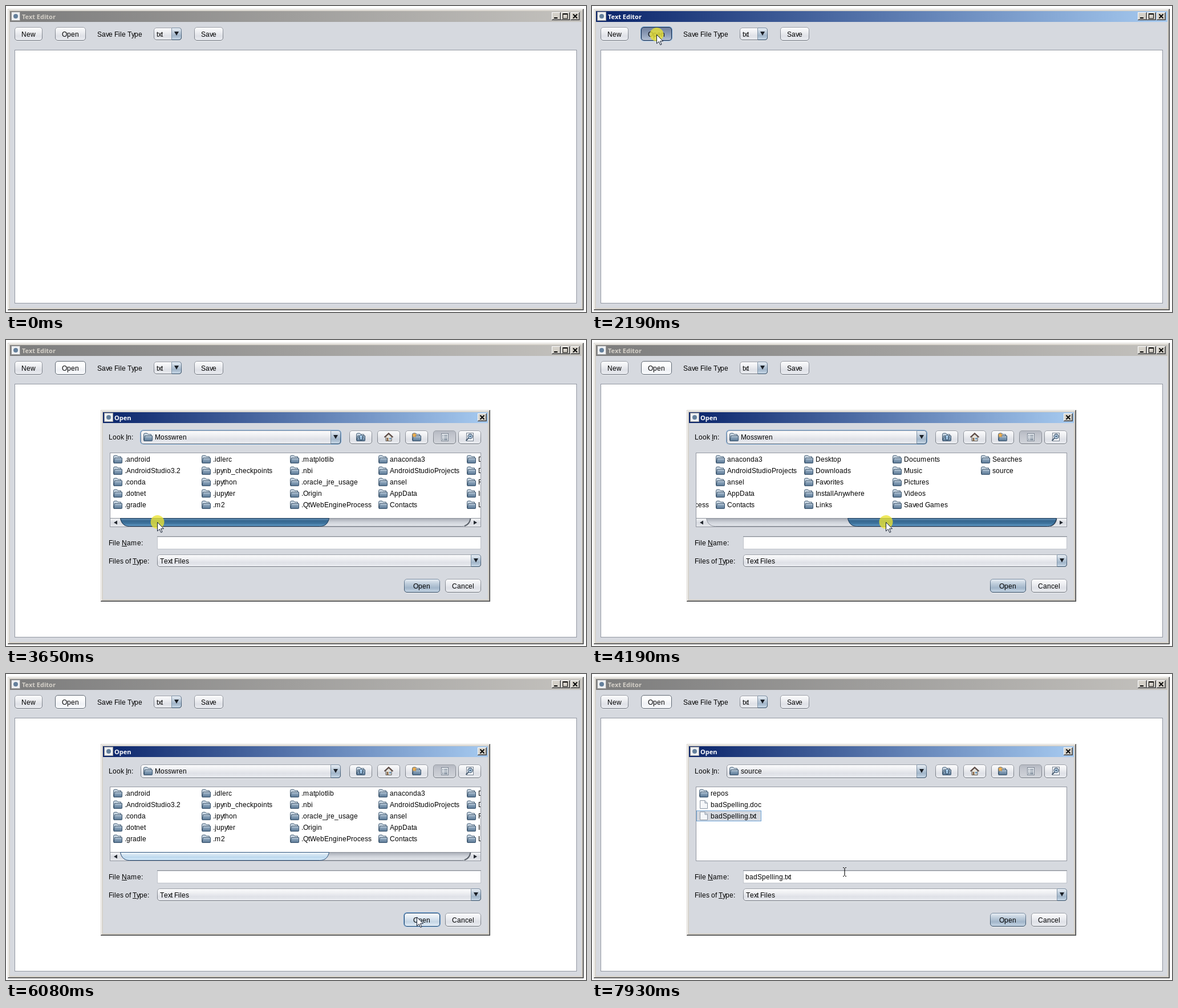
An HTML page that plays this animation: 1017 by 538 pixels, repeating every 7990 ms.

```html
<!DOCTYPE html>
<html lang="en">
<head>
<meta charset="utf-8">
<title>Text Editor</title>
<style>
html, body { margin: 0; width: 100%; height: 100%; overflow: hidden; background: #fff; }
svg { display: block; width: 1017px; height: 538px; }
text { font: 12px "Liberation Sans", Arial, sans-serif; fill: #000; white-space: pre; }
.cap { font: bold 11px "Noto Sans", "Open Sans", sans-serif; fill: #fff; }
.off { fill: #d4d0c8; }
</style>
</head>
<body>
<svg id="stage" viewBox="0 0 1017 538" xmlns="http://www.w3.org/2000/svg"></svg>
<script>
const LOOP = 7990, STEP = 60;
const pen = document.createElement('canvas').getContext('2d');
pen.font = '12px "Liberation Sans", Arial, sans-serif';

// Whole-pixel glyph advances, as in hinted screen text.
const narrow = { v: 5, x: 5, y: 5, m: 11 };
const advance = c => narrow[c] || Math.round(pen.measureText(c).width);
function text(x, y, str, mnemonic = -1) {
  const xs = [];
  let line = '';
  [...str].forEach((c, i) => {
    xs.push(x);
    if (i === mnemonic) line = rect(x, y + 1, advance(c), 1, '#000');
    x += advance(c);
  });
  return `<text x="${xs.join(' ')}" y="${y}">${str}</text>${line}`;
}
const rect = (x, y, w, h, fill, more = '') =>
  `<rect x="${x}" y="${y}" width="${w}" height="${h}" fill="${fill}" ${more}/>`;
const path = (d, fill, more = '') => `<path d="${d}" fill="${fill}" ${more}/>`;
const group = (id, body, more = '') => `<g id="${id}" ${more}>${body}</g>`;
const at = (x, y, body) => `<g transform="translate(${x} ${y})">${body}</g>`;
const grad = (id, colors, across) => {
  const stops = colors.map((c, i) => `<stop offset="${i / (colors.length - 1)}" stop-color="${c}"/>`);
  return `<linearGradient id="${id}" x2="${across ? 1 : 0}" y2="${across ? 0 : 1}">${stops.join('')}</linearGradient>`;
};

const defs = `<defs>
  ${grad('active', ['#0a246a', '#a6caf0'], true)}
  ${grad('idle', ['#7c7c7c', '#c4c2be'], true)}
  ${grad('face', ['#fcfcfd', '#eff0f3', '#dfe1e7', '#ebedf1'])}
  ${grad('hover', ['#ffffff', '#fbfcfd', '#f0f2f6', '#fafbfd'])}
  ${grad('press', ['#6f7f9c', '#8292ae', '#97a6bf', '#b4c1d4'])}
  ${grad('main', ['#e9eff5', '#c0cedc', '#a2b6ca', '#c8d8e7'])}
  ${grad('mainHover', ['#fafcfe', '#e0e9f2', '#c5d5e4', '#e4eff9'])}
  ${grad('held', ['#b3b7c0', '#c2c5cd', '#c9ccd3', '#d2d5db'])}
  ${grad('edge', ['#9da1a9', '#6f747d'])}
  ${grad('mainEdge', ['#7b8ea3', '#2d465f'])}
  ${grad('track', ['#a6abb4', '#cfd3da', '#e4e7ec'])}
  ${grad('arrowEnd', ['#f4f5f7', '#d9dce2', '#e6e8ec'])}
  ${grad('thumb', ['#f3f8fc', '#d3e4f2', '#bcd8ee', '#e2f3ff'])}
  ${grad('thumbHover', ['#fafdff', '#e5f1fb', '#d0e8fa', '#f2fbff'])}
  ${grad('thumbPress', ['#6691b7', '#35678f', '#3f759f', '#6ba4cf'])}
  ${grad('folder', ['#a9bdcf', '#7d97b0', '#587693'])}
  <clipPath id="view">${rect(183, 199, 649, 115, '#000')}</clipPath>
</defs>`;

// Window chrome
function frame(x, y, w, h) {
  return rect(x, y, w, h, '#404040') + rect(x, y, w - 1, h - 1, '#d4d0c8') +
    rect(x + 1, y + 1, w - 2, h - 2, '#808080') + rect(x + 1, y + 1, w - 3, h - 3, '#fff') +
    rect(x + 2, y + 2, w - 4, h - 4, '#d4d0c8') + rect(x + 4, y + 23, w - 8, h - 27, '#d6d9df');
}
const badge = (x, y) => rect(x + .5, y + .5, 15, 15, '#eef0f2', 'stroke="#9a9a9a"') +
  `<circle cx="${x + 8}" cy="${y + 8}" r="4" fill="#64809c"/>`;
function capButton(x, y, glyph) {
  return rect(x, y, 16, 14, '#404040') + rect(x, y, 15, 13, '#fff') +
    rect(x + 1, y + 1, 14, 12, '#808080') + rect(x + 1, y + 1, 13, 11, '#d4d0c8') + at(x, y, glyph);
}
const cross = path('M4.5 3.5l7 7M11.5 3.5l-7 7', 'none', 'stroke="#000" stroke-width="1.8"');
const bar = rect(4, 9, 6, 2, '#000');
const pane = rect(3.5, 3, 8, 8, 'none', 'stroke="#000"') + rect(3, 2, 9, 2, '#000');

// Controls
const skin = (x, y, w, h, fill, edge = 'url(#edge)') =>
  rect(x + 1, y + 1, w - 2, h, 'none', 'rx="4.5" stroke="#fff" stroke-opacity=".45"') +
  rect(x + .5, y + .5, w - 1, h - 1, `url(#${fill})`, `rx="4.5" stroke="${edge}"`);
const ring = (x, y, w, h) =>
  rect(x, y, w, h, 'none', 'rx="5" stroke="#6c9fd2" stroke-width="2"');
const button = (x, y, w, h, label, tx) => skin(x, y, w, h, 'face') + text(tx, y + 17, label);
function combo(x, y, w, h) {
  const r = x + w, b = y + h;
  return skin(x, y, w, h, 'face') +
    path(`M${r - 17} ${y + 1}H${r - 5}q4 0 4 4V${b - 5}q0 4 -4 4H${r - 17}z`, 'url(#main)') +
    path(`M${r - 17.5} ${y + 1}V${b - 1}`, 'none', 'stroke="#8295a8"') +
    path(`M${r - 17} ${y + .5}H${r - 5}q4.5 0 4.5 4.5V${b - 5}q0 4.5 -4.5 4.5H${r - 17}`, 'none', 'stroke="url(#mainEdge)"') +
    path(`M${r - 13} ${y + h / 2 - 4}h8l-4 7z`, '#1a1f26');
}

// Icons
const folder = path('M.5 13.5V3.5Q.5 1 2.5 1H6.5L8.5 3H13.5V5', '#c9d6e2', 'stroke="#3f5870"') +
  path('M1 14.5L2.5 5.5H15.5V13.5Q15.5 14.5 14.5 14.5z', 'url(#folder)', 'stroke="#37516a"') +
  path('M3.5 6.5H14.5', 'none', 'stroke="#cddae6"');
const page = path('M1.5 .5H10L14.5 5V14.5H1.5z', '#f5f7fa', 'stroke="#8b95a3"') +
  path('M10 .5V5H14.5', '#d3dae3', 'stroke="#8b95a3"');
const up = folder + path('M8.5 3.5L13 8H10.5V12.5H6.5V8H4z', '#a9cdec', 'stroke="#29435c"');
const home = path('M3 7V14.5H13V7L8 2.5z', '#e8e4dc', 'stroke="#555"') +
  path('M.5 8L8 1L15.5 8', 'none', 'stroke="#5d4a44" stroke-width="2"') +
  rect(4.5, 9, 3, 5.5, '#8a6a4a') + rect(9, 9, 3, 3, '#6f9dc4');
const star = folder + path('M4 0l1.2 2.6 2.8.4-2 2 .5 2.8L4 6.5 1.5 7.8 2 5 0 3l2.8-.4z', '#f0b050', 'stroke="#b97f2b" stroke-width=".5"');
const rows = rect(2.5, 1.5, 12, 13, '#f4f6f9', 'stroke="#76818f"') +
  [4, 7, 10, 12].map(y => rect(4, y, 2, 1, '#33485e') + rect(7, y, 6, 1, '#33485e')).join('');
const lens = rect(2.5, .5, 12, 14, '#f4f6f9', 'stroke="#76818f"') +
  `<circle cx="9" cy="6.5" r="4" fill="#c7dcef" stroke="#455a70" stroke-width="1.3"/>` +
  path('M6 9.5L1.5 14', 'none', 'stroke="#455a70" stroke-width="2"') + rect(7, 5, 4, 3, '#64809c');

// Five rows per column
const list = (names, pitch) => names.split('|').map((n, i) => {
  const x = 188 + pitch * Math.floor(i / 5), y = 202 + 20 * (i % 5);
  return at(x, y, /\.(doc|txt)$/.test(n) ? page : folder) + text(x + 20, y + 12, n);
}).join('');
const picked = (x, y, w) => rect(x + .5, y + .5, w - 1, 18, '#d6d9df', 'stroke="#6fa5d8"');

const docs = 'Audacity|Babe|Backup|Car Insurance|Elder Scrolls Online|GitHub|GOG Galaxy|HiSuite|IBM_Project|Larian Studios|' +
  'M Farrow 81 Millbank Lane|My Games|NetBeansProjects|New folder|Nexus Mod Manager|' +
  'Old1|opencv|Paradox Interactive|Parallel Programming|Probate list Sept 2018';
const homeDir = '.android|.AndroidStudio3.2|.conda|.dotnet|.gradle|.idlerc|.ipynb_checkpoints|.ipython|.jupyter|.m2|' +
  '.matplotlib|.nbi|.oracle_jre_usage|.Origin|.QtWebEngineProcess|anaconda3|AndroidStudioProjects|ansel|AppData|Contacts|' +
  'Desktop|Downloads|Favorites|InstallAnywhere|Links|Documents|Music|Pictures|Videos|Saved Games|Searches|source';

const slot = (x, w) => {
  const r = x + w;
  return `M${x} 313.5C${x + 2} 323 ${x + 7} 327.5 ${x + 16} 327.5H${r - 16}C${r - 7} 327.5 ${r - 2} 323 ${r} 313.5z`;
};
const scrollbar = rect(183, 314, 649, 14, 'url(#arrowEnd)') +
  path(slot(200.5, 614), 'url(#track)', 'stroke="#8d929b"') +
  path('M804 327Q813 324 814.5 314', 'none', 'stroke="#5c626b" stroke-width="2"') +
  rect(183, 313, 649, 1, '#8d929b') +
  path('M189 321l6-3.5v7zM826 321l-6-3.5v7z', '#22272e') +
  `<path id="grip" stroke="#2a5079"/>`;

const mainWindow = frame(3, 5, 1010, 530) +
  rect(7, 9, 1002, 19, 'url(#idle)') + group('lit', rect(7, 9, 1002, 19, 'url(#active)')) +
  badge(9, 10) + '<text id="caption" class="cap off" x="28" y="23">Text Editor</text>' +
  capButton(957, 11, bar) + capButton(973, 11, pane) + capButton(990, 11, cross) +
  button(15, 37, 49, 24, 'New', 27) +
  group('openFace', skin(86, 37, 54, 24, 'face')) +
  group('openHover', skin(86, 37, 54, 24, 'hover', '#5f6873')) +
  group('openPress', ring(86, 37, 54, 24) + skin(86, 37, 54, 24, 'press', '#1d2c49')) +
  text(98, 54, 'Open') + text(160, 54, 'Save File Type') +
  combo(259, 38, 49, 22) + text(264, 54, 'txt') +
  button(330, 37, 51, 24, 'Save', 342) +
  rect(15.5, 77.5, 985, 445, '#fff', 'stroke="#9297a1"');

const tool = (x, icon, fill = 'face') => skin(x, 159, 40, 24, fill) + at(x + 12, 163, icon);
const dialog = frame(166, 123, 683, 337) +
  rect(170, 127, 675, 19, 'url(#active)') + badge(172, 128) +
  '<text class="cap" x="190" y="141">Open</text>' + capButton(827, 129, cross) +
  text(180, 175, 'Look In:', 5) + group('lookRing', ring(236, 159, 351, 24)) +
  combo(236, 159, 351, 24) + at(241, 163, folder) +
  group('lookHome', text(261, 175, 'Mosswren')) + group('lookSource', text(261, 175, 'source')) +
  tool(602, up) + tool(651, home) + tool(700, star) + tool(749, rows, 'held') + tool(793, lens) +
  rect(182.5, 198.5, 650, 130, '#fff', 'stroke="#9297a1"') +
  `<g clip-path="url(#view)">` +
  group('listDocs', list(docs, 172)) +
  group('listHome', group('pickSource', picked(1113, 220, 155)) + list(homeDir, 155)) +
  group('listSource', group('pickFile', picked(183, 240, 114)) + list('repos|badSpelling.doc|badSpelling.txt', 155)) +
  '</g>' + group('scroll', scrollbar) +
  text(180, 361, 'File Name:', 5) +
  rect(265.5, 345.5, 567, 22, '#fff', 'stroke="#c0c4cb"') + rect(265, 345, 568, 1, '#868b93') + rect(266, 346, 566, 1, '#d9dbe0') +
  group('fileName', text(269, 361, 'badSpelling.txt')) +
  text(180, 393, 'Files of Type:', 9) + combo(265, 377, 568, 22) + text(270, 393, 'Text Files') +
  group('okRing', ring(698, 420, 63, 24)) +
  group('okFace', skin(698, 420, 63, 24, 'main', 'url(#mainEdge)')) +
  group('okHover', skin(698, 420, 63, 24, 'mainHover', '#294a6d')) +
  group('okPress', skin(698, 420, 63, 24, 'press', '#1d2c49')) +
  text(714, 437, 'Open') + button(770, 420, 63, 24, 'Cancel', 782);

const pointer = group('spot', '<circle cx=".5" cy="0" r="12" fill="#ece432" fill-opacity=".78"/>') +
  group('arrow', path('M.5 .5V16L4.2 12.6L6.8 18.4L9 17.4L6.5 11.8H11.5z', '#fff', 'stroke="#111c30" stroke-linejoin="round"')) +
  group('beam', path('M-3 -7.5H-1M1 -7.5H3M-3 7.5H-1M1 7.5H3M0 -7V7', 'none', 'stroke="#000" stroke-width="1.1"'));

stage.innerHTML = defs + mainWindow + group('dialog', dialog) + group('pointer', pointer);
const el = id => document.getElementById(id);
const show = (id, on) => el(id).setAttribute('display', on ? 'inline' : 'none');

// time, x, y, and easing power toward the next key
const route = [
  [310, 905, 515, 1], [1090, 275, 169, 2], [1570, 113, 50, 1], [2310, 113, 50, 1],
  [2500, 123, 92, 1], [2920, 250, 295, 1], [2960, 250, 295, 1], [3280, 265, 320, 1],
  [3650, 265, 320, 1], [4190, 515, 320, 1], [4250, 515, 320, 1], [4430, 606, 271, 1.2],
  [4670, 692, 227, 1], [4930, 692, 227, 1], [5590, 720, 427, 1], [6080, 720, 427, 1],
  [6740, 336, 286, 1.5], [7040, 277, 249, 1], [7540, 277, 249, 1], [7930, 443, 348, 1]
];
function place(t) {
  const i = route.findLastIndex(k => k[0] <= t);
  const a = route[Math.max(i, 0)], b = route[i + 1] || a;
  const span = b[0] - a[0] || 1;
  const p = Math.max(0, Math.floor((t - a[0]) / STEP) * STEP / span);
  const f = 1 - Math.pow(1 - Math.min(1, p), a[3]);
  return [1, 2].map(n => Math.round(a[n] + (b[n] - a[n]) * f));
}
const clicks = [[2190, 2310], [3650, 4250], [4860, 4980], [5960, 6070], [7290, 7410]];

function draw(t) {
  const [x, y] = place(t);
  const within = (l, top, r, b) => x >= l && x < r && y >= top && y < b;
  const during = (a, b = LOOP) => t >= a && t < b;

  show('pointer', t >= 310);
  el('pointer').setAttribute('transform', `translate(${x} ${y})`);
  show('spot', clicks.some(c => during(...c)));
  const beam = t < 1570 ? y > 77 : t > 7540 && y > 345;
  show('beam', beam);
  show('arrow', !beam);

  const lit = during(2190, 2440);
  show('lit', lit);
  el('caption').setAttribute('class', lit ? 'cap' : 'cap off');
  const pressed = during(2190, 2560);
  const hovered = t >= 2560 || (t >= 310 && within(86, 37, 140, 61));
  show('openPress', pressed);
  show('openHover', !pressed && hovered);
  show('openFace', !pressed && !hovered);

  show('dialog', t >= 2440);
  show('lookRing', during(2560, 4860));
  show('lookHome', t < 6140);
  show('lookSource', t >= 6140);
  show('listDocs', t < 2560);
  show('listHome', during(2560, 6140));
  show('listSource', t >= 6140);
  show('pickSource', during(4860, 6070));
  show('pickFile', t >= 7290);
  show('fileName', t >= 7350);

  const drag = during(3650, 6070) ? Math.min(248, t < 4250 ? x - 265 : 248) : 0;
  const width = t < 2560 ? 88 : 366;
  const held = during(3650, 4250);
  const over = within(200 + drag, 313, 200 + drag + width, 329);
  el('listHome').setAttribute('transform', `translate(${-Math.round(drag * 436 / 248)} 0)`);
  show('scroll', t < 6140);
  el('grip').setAttribute('d', slot(200.5 + drag, width));
  el('grip').setAttribute('fill', `url(#thumb${held ? 'Press' : over ? 'Hover' : ''})`);
  el('grip').setAttribute('stroke', held ? '#12304f' : '#2a5079');

  const okPress = during(5960, 6070), okHover = within(698, 420, 761, 444);
  show('okRing', during(5960, 7290));
  show('okPress', okPress);
  show('okHover', !okPress && okHover);
  show('okFace', !okPress && !okHover);
}

const start = performance.now();
function tick() {
  draw((performance.now() - start) % LOOP);
  requestAnimationFrame(tick);
}
tick();
</script>
</body>
</html>
```
